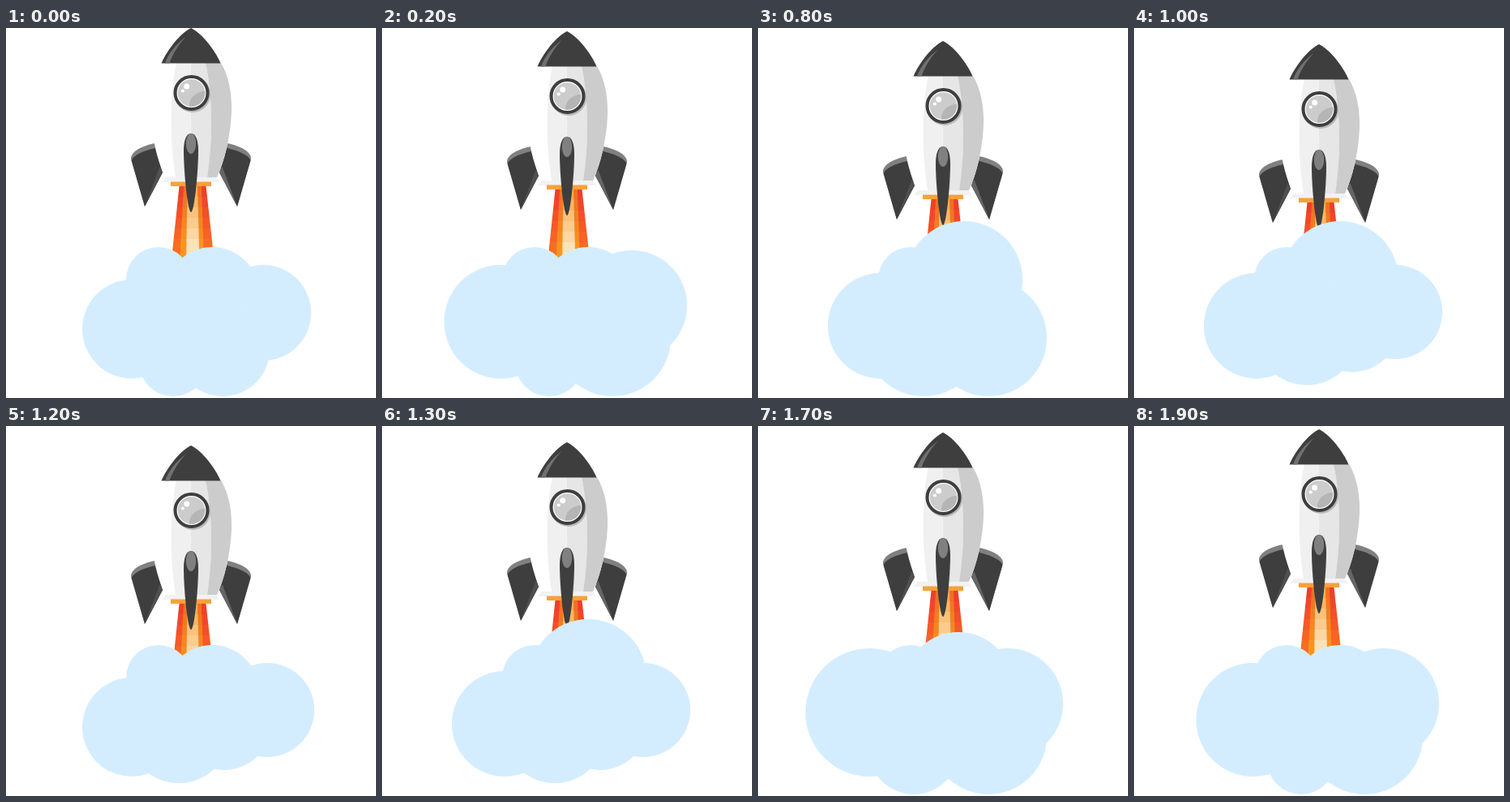
An HTML page for the animation above (2.3 s loop, 456 by 456 pixels).

```html
<!DOCTYPE html>
<html lang="en">
<head>
<meta charset="utf-8">
<title>Rocket launch</title>
<style>
  html, body { margin: 0; width: 100%; height: 100%; overflow: hidden; background: #fff; }
  svg { display: block; width: 100vw; height: 100vh; }
</style>
</head>
<body>
<svg viewBox="0 0 456 456">
  <g id="rocket">
    <g id="flame"></g>
    <!-- side fins -->
    <path fill="#808080" d="M184 142C168 145 154 152 154 161L171 220 193 178Z"/>
    <path fill="#3e3e3e" d="M184 148C170 151 158 156 154.500 163L171 220 193 178Z"/>
    <path fill="#505050" d="M189.500 171L193 178 171 220Z"/>
    <path fill="#808080" d="M272 142C288 145 302 152 302 161L285 220 263 178Z"/>
    <path fill="#3e3e3e" d="M271 147.500C286 151 298 156 301.500 163L285 220 263 178Z"/>
    <path fill="#666" d="M263 178L266.500 171 285 220Z"/>
    <!-- body -->
    <path fill="#fff" d="M191 43C181 60 178 80 178 98C178 130 187 165 196 184H260C269 165 278 130 278 98C278 80 275 60 265 43Z"/>
    <path fill="#f0f0f0" d="M210 43C201 85 202 140 209 184H228V43Z"/>
    <path fill="#e6e6e6" d="M228 43H247V184H228Z"/>
    <path fill="#e6e6e6" d="M246 43C255 85 255 140 248 184H246Z"/>
    <path fill="#ccc" d="M246 43H265C275 60 278 80 278 98C278 130 269 165 260 184H248C255 140 255 85 246 43Z"/>
    <path fill="#f2f2f2" d="M197 184H259L264 190H192Z"/>
    <path fill="#f9a13a" d="M203 189.500H253V195H203Z"/>
    <!-- nose -->
    <path fill="#3e3e3e" d="M228 0C242 7 258 28 264.500 43.500H191.500C198 28 214 7 228 0Z"/>
    <path fill="#707070" d="M222 10.500C209 20 200 32 196 43.500H201.500C205 33 212 21 222 10.500Z"/>
    <!-- window -->
    <circle cx="230" cy="82" r="22" fill="#b8b8b8"/>
    <circle cx="228.500" cy="80" r="20" fill="#fff" stroke="#3e3e3e" stroke-width="4"/>
    <circle cx="228.500" cy="80" r="16.800" fill="#ccc"/>
    <path fill="#b5b5b5" d="M245.200 78C235 78 225 86 226 96.600A16.800 16.800 0 0 0 245.200 78Z"/>
    <circle cx="222.700" cy="72" r="3.500" fill="#fff"/>
    <circle cx="217.800" cy="77.500" r="2.100" fill="#fff"/>
    <!-- middle fin -->
    <path fill="#3e3e3e" d="M228 130C234 130 237 139 237 151C237 178 232 227 228 227C224 227 219 178 219 151C219 139 222 130 228 130Z"/>
    <ellipse cx="228" cy="142.500" rx="6.200" ry="12.500" fill="#808080"/>
  </g>
  <g id="cloud" fill="#d3edff"></g>
</svg>
<script>
const $ = id => document.getElementById(id);

// Flame: nested wedges cut into bands that get lighter downwards.
const wedges = [
  [213.5, 246.5, 203.5, 257, [239, 62, 42], [249, 108, 36]],
  [219, 241, 214, 244, [240, 112, 35], [250, 148, 30]],
  [223.5, 236, 222, 238.5, [248, 172, 78], [252, 226, 186]]
];
const bands = [195, 208, 221, 234, 247, 260, 290];
const mix = (a, b, k) => a + (b - a) * k;
$('flame').innerHTML = wedges.map(([l, r, l2, r2, from, to]) =>
  bands.slice(1).map((y2, i) => {
    const y1 = bands[i], k1 = (y1 - 195) / 95, k2 = (y2 - 195) / 95;
    const rgb = from.map((v, c) => Math.round(mix(v, to[c], i / 5)));
    return `<path fill="rgb(${rgb})" d="M${mix(l, l2, k1)} ${y1}H${mix(r, r2, k1)}` +
      `L${mix(r, r2, k2)} ${y2}H${mix(l, l2, k2)}Z"/>`;
  }).join('')).join('');

// Cloud puffs as [x, y, radius]
const small = [188, 310, 40];
const topLow = [254, 328, 58], topHigh = [254, 310, 72];
const leftRest = [155, 371, 61], leftMid = [151, 367, 65];
const rightBig = [308, 342, 68], rightEnd = [322, 350, 58];
const baseBig = [284, 382, 72], baseHigh = [269, 366, 58];
const footRest = [206, 412, 42], footHigh = [213, 376, 64];

// Poses: rocket drop, then the puffs
const rest = [0, leftRest, topLow, [317, 351, 59], [267, 396, 58], footRest];
const swell = [4, [146.5, 362, 70], topLow, rightBig, baseBig, footRest];
const wide = [8, [137.5, 353, 79], [247, 321, 67], rightBig, baseBig, [192, 398, 56]];
const tall = [16, leftMid, topHigh, baseBig, [204, 381, 73]];
const low = [20, leftMid, topHigh, rightEnd, baseHigh, footHigh];
const lowest = [24, leftRest, topLow, rightEnd, baseHigh, footHigh];

const steps = [
  [0, rest], [200, swell], [600, wide], [800, tall], [1000, low],
  [1200, lowest], [1300, low], [1500, tall], [1700, wide], [1900, swell]
];

let shown;
function draw(now) {
  const t = now % 2300;
  const pose = steps.findLast(([start]) => start <= t)[1];
  if (pose !== shown) {
    const [drop, ...puffs] = shown = pose;
    $('rocket').setAttribute('transform', `translate(0 ${drop})`);
    $('cloud').innerHTML = [small, ...puffs]
      .map(([x, y, r]) => `<circle cx="${x}" cy="${y}" r="${r}"/>`).join('');
  }
}
function tick() {
  draw(performance.now() - begin);
  requestAnimationFrame(tick);
}
const begin = performance.now();
tick();
</script>
</body>
</html>
```
